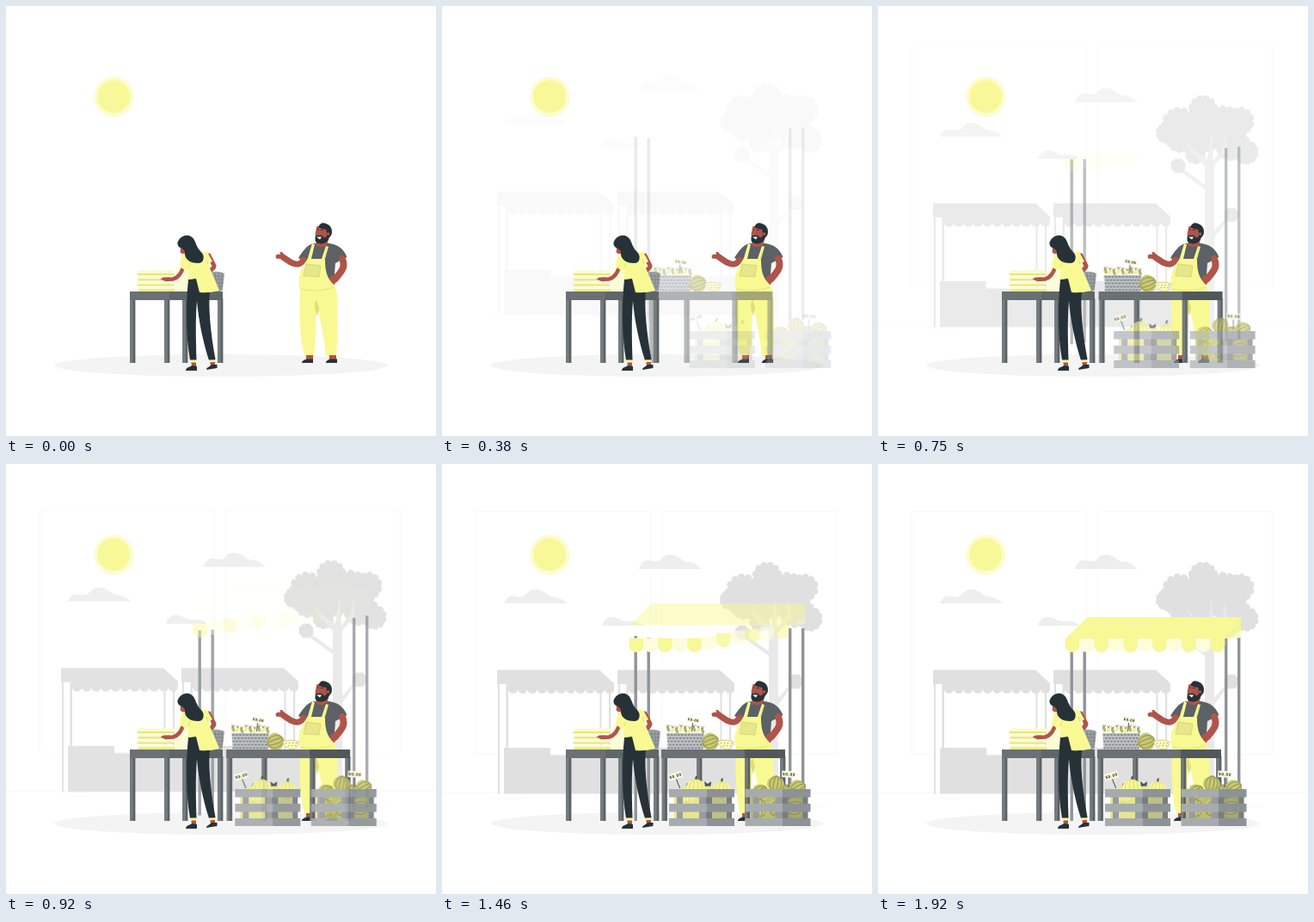
An HTML page for the animation above (1960 ms loop, 500 by 500 pixels).

```html
<!DOCTYPE html>
<html lang="en">
<head>
<meta charset="utf-8">
<title>Market stall</title>
<style>
html, body { margin: 0; width: 100%; height: 100%; overflow: hidden; background: #fff; }
svg { display: block; width: 100vw; height: 100vh; }
text { font: 700 4.6px "Open Sans", Arial, sans-serif; fill: #263238; letter-spacing: .6px; }
.part { animation: 1960ms linear infinite both; }
.y { fill: #f9f994; }
.k { fill: #263238; }
.skin { fill: #b0544a; }
.arm { fill: none; stroke: #b0544a; stroke-linecap: round; stroke-linejoin: round; }
.shirt { fill: #5b6165; }
.bg { fill: #e0e0e0; }
.cloud { fill: #eee; }
.line { fill: none; stroke: #f8f8f8; }
.fold { fill: none; stroke: #d8d878; stroke-width: .7; }
</style>
</head>
<body>
<svg viewBox="0 0 500 500">
  <defs>
    <g id="stall">
      <path class="bg" d="M64 239.500H183L200 255V263H77V256H64Z"/>
      <g id="fringe" class="bg"></g>
      <path class="bg" d="M65 255h2v128.500h-2zM74.500 255h2.500v128.500h-2.500zM183.500 260h2v123.500h-2zM194 260h2.200v123.500h-2.200zM72 330h54v8.500h79v45H72z"/>
    </g>
    <g id="crateFront">
      <path fill="#62686b" opacity=".3" d="M308 382h26v34h-26z"/>
      <path fill="#979c9f" d="M273 378h7v43h-7zM299 378h8v43h-8z"/>
      <path fill="#777d80" d="M307 378h7v43h-7zM331 378h6v43h-6z"/>
      <path fill="#a6abad" d="M264 378h44v9.500h-44zM264 395h44v9.500h-44zM264 412h44v9h-44z"/>
      <path fill="#8c9295" d="M308 378h32v9.500h-32zM308 395h32v9.500h-32zM308 412h32v9h-32z"/>
    </g>
    <g id="tag">
      <path fill="none" stroke="#4b5356" d="M8 7L9 19"/>
      <path fill="#fbfbdc" d="M0 0H16V7.500H0Z"/>
      <text x="1" y="5.400">$0.00</text>
    </g>
  </defs>

  <g id="back">
    <path class="line" d="M0 382.500H500M39.500 55.500H242.500V337.500H39.500ZM255.500 55.500H458.500V337.500H255.500ZM58 388.500H97M430 398.500H447"/>
    <path class="cloud" d="M229 122C231 115 236 111 242 112C248 114 253 114 256 109C262 103 272 106 277 110C283 116 287 112 292 115C297 117 298 119 302 122Z"/>
    <path class="cloud" d="M72 162C74 155 80 152 86 154C92 156 96 153 99 150C105 143 115 146 120 150C126 156 130 153 135 156C140 157 142 159 145 162Z"/>
    <path class="cloud" d="M186 188C188 181 193 177 200 178C206 179 210 184 216 183C223 183 228 182 234 188Z"/>
    <g id="leaves" class="bg"></g>
    <path fill="#e9e9e9" d="M380 384L380 196L366 182L357 167L372 181L383 188L388 156L390 190L401 176L403 160L406 178L391 196V272L404 257L406 259L391 280V384Z"/>
    <path fill="none" stroke="#e9e9e9" stroke-width="4" d="M382 222L354 202"/>
    <use href="#stall"/>
    <use href="#stall" x="140"/>
  </g>

  <ellipse cx="250" cy="418" rx="193.500" ry="13" fill="#f4f4f4"/>
  <circle cx="125.500" cy="105.500" r="23.300" fill="#fcfccf"/>
  <circle cx="125.200" cy="105.300" r="19" fill="#f8f899"/>

  <g id="poles"></g>

  <g id="man">
    <path class="shirt" d="M357 276C349 279 345 285 340 293L350 298L353 326H381L383 299L396.500 292C392 281 386 278 376 276Z"/>
    <path class="arm" stroke-width="7" d="M346 295C342 302 337 301 331 298L322 292"/>
    <path class="skin" d="M326 296L319 294L314 293.500L313.500 290L316.500 288.500L319 289L318.500 286L321 286L324 289.500L330 294Z"/>
    <path class="arm" stroke-width="8" d="M391 294C395 303 391 308 383 317"/>
    <path class="skin" d="M386 310L377 315L377 322L380 326L384 321Z"/>
    <path class="skin" d="M363 268L375 269L374 277Q368 283 360 278Z"/>
    <path class="y" d="M356 276L359 277L355 294H367L372 279L375 280L371 294C371 306 372 316 382 325C384 328 385 333 385 340C386 365 386 386 384 407H372C370 387 366 366 361 345C361 366 360 387 358 407H347C341 383 341 357 342 330C339 321 340 311 346 302L351 293Z"/>
    <path fill="#dede7a" d="M361 341C357 349 360 356 362 360L364 352Z"/>
    <path fill="#e6e68a" stroke="#c8c870" stroke-width=".6" d="M349 300L366 302L364 315L346 314Z"/>
    <path class="fold" d="M342 329Q360 334 381 327M373 282L370 295"/>
    <path class="skin" d="M361.500 256L373 256L375 270L367 275L361 273L359.500 265Z"/>
    <path class="k" d="M363.500 257.500C364 253 368 251 372 253C378 255 380 260 378.500 266L375.500 270C374 275 369 277.500 363 276C359 275 359 271 360 267L367 266.500L370 269.500L373 268L372.500 260Q367 259 363.500 257.500Z"/>
    <path fill="#fff" d="M361 268.500L367 268.500L365 271.500Z"/>
    <circle class="skin" cx="374.500" cy="265" r="1.800"/>
    <path stroke="#263238" stroke-width=".9" d="M361.500 260h2M366 260.500h2.500"/>
    <path class="skin" d="M349 406H357V411H349ZM376 406H384V411H376Z"/>
    <path class="k" d="M344 415C344 412 349 411 350 410.500H357V415ZM372 415C372 412 376 411 377 410.500H385V415Z"/>
  </g>

  <g id="rightTable">
    <g id="basket"></g>
    <g id="melon"></g>
    <path fill="#fbfbbf" stroke="#c4c46c" stroke-width=".8" d="M320 323Q329 319 339 323Q338 331 332 332Q324 331 320 323Z"/>
    <path fill="none" stroke="#8a8a52" stroke-width=".9" stroke-dasharray="1 3" d="M324 324.500H337M327 327.500H336"/>
    <g id="rightLegs"></g>
    <path fill="#6a7073" d="M255 332H399V342H255Z"/>
    <path fill="#51585c" d="M352 332H399V342H352Z"/>
    <use href="#tag" transform="translate(285.500 293) rotate(10) scale(.9)"/>
  </g>

  <g id="leftTable">
    <path fill="#9da2a5" d="M238 310Q246 307 254 311L252 329Q250 333 244 332Z"/>
    <path fill="none" stroke="#70777b" stroke-width=".6" d="M239 314H253M240 318H253M241 322H253M242 326H252M243 310L246 332M247 310L249 332M251 310L251 331"/>
    <path fill="#fcfcd6" d="M198 305H213V332H197Z"/>
    <g id="trays"></g>
    <g id="leftLegs"></g>
    <path fill="#6a7073" d="M144 332H252V342H144Z"/>
    <path fill="#555c60" d="M190 332H252V342H190Z" opacity=".5"/>
  </g>

  <g id="woman">
    <path class="arm" stroke-width="5" d="M236 290L242 302C242 305 240 306 237 308"/>
    <path class="skin" d="M215 410H221V420H216ZM237 410H243V419H238Z"/>
    <path class="k" d="M212 318L224 316L237 331C235 352 238 380 243.500 411L236 412C229 390 224 366 222 343C220 366 221 390 221.500 412L214 412C209 382 209 348 212 318Z"/>
    <path fill="#f9f994" d="M214 411.500H221.500V414.500H214.500ZM236 411.500H243.500V414H236.500Z"/>
    <path class="k" d="M209 424C209 420 214 420 216 418L222 419V424ZM233 423C233 420 238 419 239 417L245.500 417V421Z"/>
    <path class="arm" stroke-width="4.600" d="M207 302C203 312 200 316 194 317.500L186 318"/>
    <path class="skin" d="M190 315.500L183 315.500L179.500 317.500L184 319.500L191 319.500Z"/>
    <path class="y" d="M205 289L216 286L234 286L240 297L235 300C239 310 244 320 248 331Q236 334 225 333L221 317L212 318L212 305L209 308L202 303Q203 294 205 289Z"/>
    <path class="fold" d="M212 305L214 299M235 300L233 294"/>
    <path class="skin" d="M203.500 278L202.500 286Q204 289 208 288L214 289L215 278Z"/>
    <path class="k" d="M199.500 275C202 268 208 266 213 267C219 269 220 275 222 279C224 285 231 287 229.500 294Q229 299 223 299C216 299 209 296 208 289C209 284 205 282 202.500 281Q199 279 199.500 275Z"/>
  </g>

  <g id="crates">
    <g id="pumpkins"></g>
    <use href="#tag" transform="translate(262.500 361.500) rotate(-17)"/>
    <use href="#crateFront"/>
    <g id="melons"></g>
    <use href="#tag" transform="translate(395.500 356.500) rotate(4)"/>
    <use href="#crateFront" x="88.500"/>
  </g>

  <g id="valance"></g>
  <g id="roof">
    <path fill="#fbfbc6" d="M422 178V202L404 203Z"/>
    <path fill="#f8f896" d="M244 178H422L404 203H218Z"/>
    <path fill="#f4f49a" d="M422 178L404 203H408L422 193Z"/>
  </g>
</svg>
<script>
const LOOP = 1960;
const $ = id => document.getElementById(id);
const range = (n, f) => Array.from({ length: n }, (_, i) => f(i)).join('');
const rect = (x, y, w, h, fill) => `<rect x="${x}" y="${y}" width="${w}" height="${h}" fill="${fill}"/>`;

// Foliage: a disc with a scalloped rim.
function clump([x, y, r]) {
  const n = Math.round(r * .6) + 3;
  const at = i => {
    const a = i / n * 2 * Math.PI;
    return `${(x + r * Math.cos(a)).toFixed(1)} ${(y + r * Math.sin(a)).toFixed(1)}`;
  };
  return `<path d="M${at(0)}${range(n, i => `A4 4 0 0 1 ${at(i + 1)}`)}Z"/>`;
}

$('leaves').innerHTML = [
  [378, 131, 15], [350, 148, 17], [335, 158, 11], [401, 148, 19], [421, 144, 14],
  [380, 154, 24], [428, 180, 13], [412, 170, 17], [369, 182, 11], [352, 163, 16],
  [349, 196, 8], [411, 253, 8]
].map(clump).join('');

$('fringe').innerHTML = range(11, i => `<ellipse cx="${82.6 + i * 11.2}" cy="262" rx="5.400" ry="5"/>`);

// Ribbed fruit, tilted by an angle.
function fruit(x, y, rx, ry, fill, rib, tilt = 0, width = 1) {
  const ring = k => `<ellipse rx="${rx * k}" ry="${ry}" fill="none" stroke="${rib}" stroke-width="${width}"/>`;
  return `<g transform="translate(${x} ${y}) rotate(${tilt})">
    <ellipse rx="${rx}" ry="${ry}" fill="${fill}"/>${ring(.25)}${ring(.68)}</g>`;
}
const pumpkin = (x, y, r) => fruit(x, y, r, r * .95, '#f7f799', '#d5d570', 0, .8)
  + `<path d="M${x - 1} ${y - r}l1 -3l2 0l-1 4z" fill="#4b5356"/>`;
const melon = (x, y, r, tilt) => fruit(x, y, r, r * .9, '#c9c975', '#a0a058', tilt, 1.4);

$('melon').innerHTML = melon(312, 323, 10.5, 70);
$('pumpkins').innerHTML = rect(270, 382, 66, 34, '#e6e690')
  + pumpkin(285, 384, 10) + pumpkin(295, 377, 11) + pumpkin(325, 379, 10.5) + pumpkin(311, 383, 9)
  + '<path d="M305 369l4 3l4-3l-1 5l-6 1z" fill="#4b5356"/>';
$('melons').innerHTML = rect(359, 382, 66, 34, '#bcbc6e')
  + melon(370, 382, 10, 50) + melon(388, 372, 10, 10) + melon(402, 381, 9, -30) + melon(414, 377, 10, 60)
  + range(3, i => melon(370 + i * 20, 400, 11, 40 * i));

// Woven basket with bunches of roots.
$('basket').innerHTML = range(9, i => {
  const x = 263 + i * 5, y = 308 + i % 3;
  return `<ellipse cx="${x}" cy="${y}" rx="1.800" ry="3.600" fill="${i % 2 ? '#eeee96' : '#b4b46a'}" transform="rotate(${i % 2 ? 18 : -18} ${x} ${y})"/>
    <path d="M${x} ${y - 2}l-1.500 -3M${x} ${y - 2}l1.500 -3" stroke="#7f8455" stroke-width=".8"/>`;
}) + '<path d="M261 313H304.500L303 332H263Z" fill="#bcc0c2"/>'
  + range(5, i => `<path d="M262 ${315 + i * 3.8}H304" stroke="#7d8488" stroke-width="1.500" stroke-dasharray="2.600 1.400" stroke-dashoffset="${i % 2 * 2}"/>`);

$('trays').innerHTML = range(4, i => {
  const y = 308 + i * 6.2, x = 152 + i % 2;
  return `<rect x="${x}" y="${y}" width="44" height="4.600" rx="2" fill="#fbfbd2"/>
    <rect x="${x + .5}" y="${y + 3}" width="43" height="2.200" rx="1" fill="#e6e67c"/>`;
}) + range(5, i => `<ellipse cx="${159 + i * 8}" cy="308.500" rx="3.400" ry="1.800" fill="#fbfbd2"/>`);

const legs = xs => xs.map(x => rect(x, 340, 3.4, 75, '#757c7f') + rect(x + 3.2, 340, 3.2, 75, '#5b6265')).join('');
$('leftLegs').innerHTML = legs([144, 184, 205, 246]);
$('rightLegs').innerHTML = legs([255.5, 296, 352, 393]);

$('poles').innerHTML = [[223.5, 200], [238.5, 202], [403, 191], [418, 191]]
  .map(([x, y]) => `<g>${rect(x, y, 3.4, 415 - y, '#8f9498')}</g>`).join('');

$('valance').innerHTML = range(11, i =>
  `<path d="M${217.5 + i * 16.9} 202.500h16.900v8a8.450 8.450 0 0 1 -16.900 0z" fill="${i % 2 ? '#fdfddd' : '#f8f896'}"/>`);

// Each part eases in from an offset over `ms`, then rests until the loop ends.
// `hidden` is the share of that time before it starts to fade in.
const sheet = document.createElement('style');
let count = 0;
function enter(el, x, y, ms, { ease = 'ease-in', hidden = 0 } = {}) {
  const name = 'in' + count++;
  const end = ms / LOOP * 100;
  const timing = `animation-timing-function:${ease}`;
  sheet.textContent += `@keyframes ${name} {
    0% { opacity:0; transform:translate(${x}px,${y}px); ${timing} }
    ${hidden ? `${end * hidden}% { opacity:0; ${timing} }` : ''}
    ${end}%, 100% { opacity:1; transform:none } }\n`;
  el.classList.add('part');
  el.style.animationName = name;
}

enter($('back'), 0, -30, 965);
enter($('crates'), 30, 0, 965);
enter($('rightTable'), -30, 0, 980, { ease: 'cubic-bezier(.36,-.01,.5,1.38)' });
[...$('poles').children].forEach((pole, i) => enter(pole, 0, -60, 985 + i * 35));
[...$('valance').children].forEach((flap, i) => enter(flap, 0, -50, 1190 + i * 64, { hidden: .4 }));
enter($('roof'), 0, -50, 1840, { hidden: .4 });
document.head.append(sheet);
</script>
</body>
</html>
```
